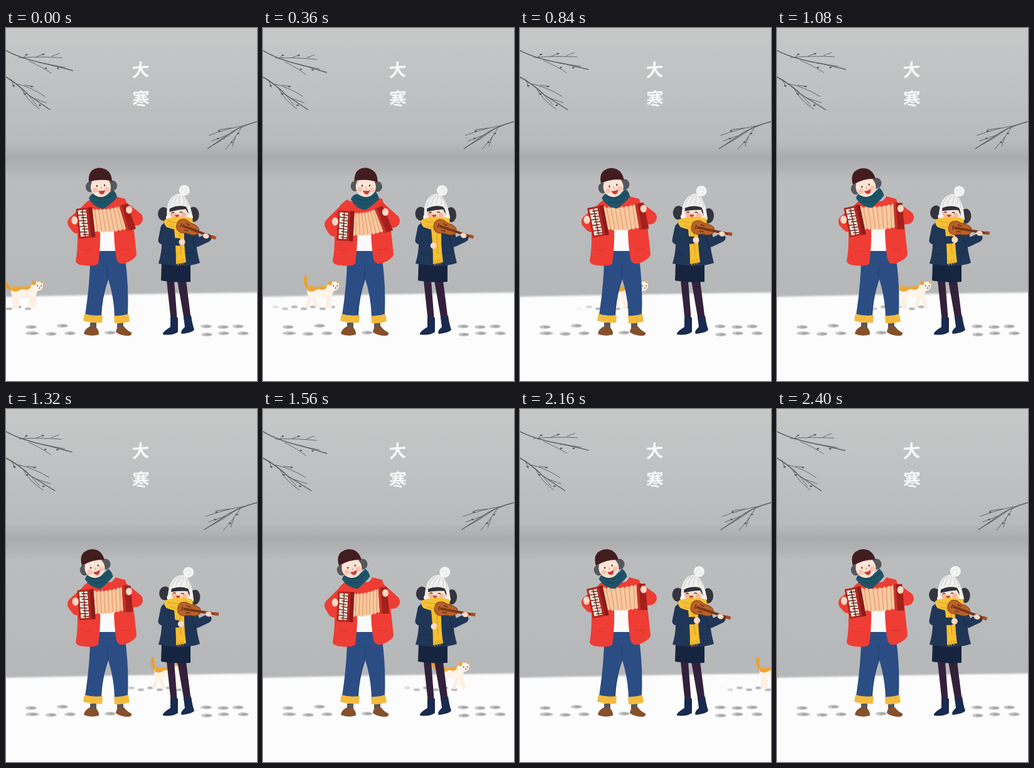
An HTML page for the animation above (2520 ms loop, 400x562 px).

```html
<!DOCTYPE html>
<html lang="zh">
<head>
<meta charset="utf-8">
<style>
  html, body { margin: 0; width: 100%; height: 100%; overflow: hidden; background: #fcfcfc; }
  svg { display: block; width: 100vw; height: 100vh; }
  .title { font: 700 28px "Noto Sans CJK SC", "Noto Sans CJK", "Noto Serif", serif; fill: #f8f8f6; text-anchor: middle; }
  .line { fill: none; stroke-linecap: round; stroke-linejoin: round; }
</style>
</head>
<body>
<svg viewBox="0 0 400 562">
  <defs>
    <linearGradient id="sky" x1="0" y1="0" x2="0" y2="1">
      <stop offset="0" stop-color="#c6c8c8"/>
      <stop offset=".22" stop-color="#c0c1c2"/>
      <stop offset=".42" stop-color="#b9babb"/>
      <stop offset=".48" stop-color="#abacae"/>
      <stop offset=".52" stop-color="#b1b2b4"/>
      <stop offset=".56" stop-color="#bbbcbe"/>
      <stop offset=".8" stop-color="#b8babb"/>
      <stop offset="1" stop-color="#b5b7b8"/>
    </linearGradient>
    <filter id="soft" x="-5%" y="-20%" width="110%" height="140%"><feGaussianBlur stdDeviation="1.5"/></filter>
    <clipPath id="scene"><rect width="400" height="562"/></clipPath>
  </defs>

  <g clip-path="url(#scene)">
    <rect width="400" height="430" fill="url(#sky)"/>
    <path d="M-9 428 Q90 426 200 424 T409 421 V580 H-9Z" fill="#fcfcfc" filter="url(#soft)"/>
    <g id="steps" fill="#c3c4c6"></g>
    <g id="twigs" class="line" stroke="#5c5e62"></g>
    <g class="title">
      <text transform="translate(214.5 77) skewY(-4)">大</text>
      <text transform="translate(215 123) skewY(-3)">寒</text>
    </g>

    <g id="prints" fill="#b9babd"></g>
    <g id="cat">
      <path id="catTail" class="line" stroke="#e9a02f" stroke-width="5"/>
      <path id="catLegs" class="line" stroke="#fbf0e2" stroke-width="6"/>
      <path d="M-42 415 Q-42 410 -34 412 Q-22 414 -8 409 L1 413 Q0 428 -9 429 Q-23 426 -34 430 Q-43 429 -42 415Z" fill="#fdf3e7"/>
      <path d="M-42 417 Q-42 409 -33 411.5 Q-22 413 -10 409.5 Q-11 417 -18 417 Q-24 414 -29 418 Q-37 422 -42 417Z" fill="#eda537"/>
      <path d="M-8 411 L-8 401 L-2 404 H3 L8 402 L9 410 Q8 418 1 418.5 Q-7 418 -8 411Z" fill="#fdf3e7"/>
      <path d="M-8 409 L-8 401 L-2 404 L-3 409ZM4 404 L8 402 L8 407Z" fill="#e9a02f"/>
      <path d="M0 410v1M6 410v1M3 414h1" class="line" stroke="#4c3a34" stroke-width="1.4"/>
    </g>

    <g id="man">
      <path d="M134 469 h10 v9 h-10ZM177 469 h10 v8 h-10Z" fill="#56585f"/>
      <path d="M124 487 Q125 479 134 475 L143 476 Q149 482 148 488 Q136 492 124 487ZM175 484 Q176 477 180 475 L188 475 Q192 481 200 485 Q201 489 196 490 Q182 490 175 484Z" fill="#85502c"/>
      <path d="M134 366 L150 350 H174 L190 368 Q196 410 194 458 L173 459 Q172 428 163 400 Q153 428 152 459 L126 457 Q134 405 134 366Z" fill="#2b4d84"/>
      <path d="M162 378 V400 Q153 428 151 456" class="line" stroke="#1f3f70" stroke-width="1"/>
      <path d="M125 455 Q138 459 154 457 L153 469 Q136 470 123 466ZM172 458 Q184 459 195 455 L197 467 Q184 471 173 470Z" fill="#f3bb3d"/>
      <path d="M147 290 H174 V355 H148Z" fill="#fafafa"/>
      <path d="M134 273 Q121 281 114 298 L114 334 Q114 357 111 371 Q112 377 124 378 Q143 380 147 375 Q151 347 150 318 L148 282ZM174 268 L190 272 L203 315 Q206 340 208 360 Q207 368 189 375 Q179 377 176 368 Q172 345 172 315 L167 282Z" fill="#ee3d34"/>
      <path d="M121 353 q7 3 15 1 M183 352 q8 2 16 -1" class="line" stroke="#d32e28" stroke-width="1" opacity=".6"/>
      <path d="M137 280 L176 274 L174 308 H149Z" fill="#ee3d34"/>
      <path id="sleeves" class="line" stroke="#ee3d34" stroke-width="22"/>
      <path id="folds" class="line" stroke="#cf2d28" stroke-width="1"/>
      <path id="bellows" fill="#f8c9a0"/>
      <path id="pleats" class="line" stroke="#e79a70" stroke-width="1.3"/>
      <g id="basses">
        <path d="M-8 -21 L6 -21 L9 21 L-6 21Z" fill="#a3201d"/>
        <path d="M-8 -21 L-4 -21 L-2 21 L-6 21Z" fill="#c83227"/>
      </g>
      <g id="keys">
        <rect x="-13" y="-24" width="26" height="48" rx="1.5" fill="#b4271f"/>
        <path d="M13 -24 v48 h-6 v-48Z" fill="#8c1b1a"/>
        <rect x="-10" y="-21" width="13" height="42" fill="#fbefe0"/>
        <path id="keyLines" class="line" stroke="#6d2320" stroke-width="1.5"/>
      </g>
      <g id="hands" fill="#fbd9c5"></g>
      <g id="manScarf">
        <path d="M132 271 Q136 262 143 263 Q158 271 170 257 Q176 262 177 270 Q169 279 156 288 Q140 286 132 271Z" fill="#1f5468"/>
        <path d="M139 268 Q155 278 172 264 M143 276 Q153 281 164 276" class="line" stroke="#174457" stroke-width="1.2"/>
      </g>
      <g id="manHead">
        <ellipse cx="-17" cy="2" rx="7" ry="8.5" fill="#55575d"/>
        <ellipse cx="18" cy="0" rx="8" ry="8.5" fill="#55575d"/>
        <ellipse cx="0" cy="2" rx="16" ry="16" fill="#fde4d5"/>
        <circle cx="-9" cy="7" r="4" fill="#f8b7a0" opacity=".75"/>
        <circle cx="10" cy="6" r="4" fill="#f8b7a0" opacity=".75"/>
        <path d="M-6 0v1M6 -1v1" class="line" stroke="#362422" stroke-width="2"/>
        <path d="M0 2 q3 2 0 3" class="line" stroke="#ea9b83" stroke-width="1.2"/>
        <path d="M-4 8 Q2 9 7 7 Q6 14 2 14 Q-2 14 -4 8Z" fill="#d23b35"/>
        <path d="M-19 -6 Q-21 -27 -2 -28.5 Q17 -27 18 -7 Q0 -12 -19 -6Z" fill="#421d20"/>
      </g>
    </g>

    <g id="girl">
      <path d="M256 402 H268 L273 467 H263ZM273 402 H287 L295 465 H284Z" fill="#33213c"/>
      <path d="M262 461 L274 461 L274 484 Q265 490 250 488 Q249 484 262 476ZM283 460 L295 458 Q297 472 300 480 Q298 485 280 487 Q277 483 285 476Z" fill="#182a50"/>
      <path d="M248 374 H294 L294 404 Q272 406 247 402Z" fill="#16243f"/>
      <path d="M254 306 Q272 316 296 308 Q303 326 303 340 Q304 356 309 374 Q285 383 243 375 Q249 355 248 337 Q246 316 254 306Z" fill="#203656"/>
      <path d="M296 318 L304 342 L321 334" class="line" stroke="#203656" stroke-width="13"/>
      <path d="M297 332 L301 350 M252 360 h9 M288 358 h10" class="line" stroke="#172a47" stroke-width="1.2"/>
      <path d="M267 312 L284 311 Q283 345 287 373 L271 376 Q271 344 267 312Z" fill="#f5bf30"/>
      <path d="M274 370v8M278 369v8M282 368v8M277 322 q0 20 2 38" class="line" stroke="#d89a20" stroke-width="1.2"/>
      <path d="M253 318 L249 338" class="line" stroke="#203656" stroke-width="13"/>
      <path id="bowArm" class="line" stroke="#203656" stroke-width="12"/>
      <circle id="bowHand" r="5" fill="#fbd9c5"/>
      <g id="girlHead">
        <ellipse cx="252" cy="295" rx="9" ry="11" fill="#34343e"/>
        <ellipse cx="300" cy="298" rx="8.5" ry="12" fill="#34343e"/>
        <ellipse cx="275" cy="294" rx="17" ry="15" fill="#fde1d0"/>
        <path d="M258 296 Q258 280 277 281 Q295 282 294 299 Q288 292 288 289 Q275 289 262 292Z" fill="#30303a"/>
        <circle cx="266" cy="298" r="4" fill="#f7ab8d" opacity=".8"/>
        <circle cx="284" cy="298" r="4" fill="#f7ab8d" opacity=".8"/>
        <path d="M265 294 q2 -2 4 0M278 294 q2 -2 4 0" class="line" stroke="#3d2a2a" stroke-width="1.2"/>
        <path d="M270 297 h7 q-1 5 -4 5 q-3 -1 -3 -5Z" fill="#d4443a"/>
        <path d="M257 299 Q257 268 276 264 Q292 263 298 300 L292 301 Q292 290 288 285 Q275 281 262 287 Q262 294 260 302Z" fill="#efefed"/>
        <path d="M262 284 Q265 270 274 266M269 281 Q271 272 277 267M277 280 Q279 272 280 267M285 281 Q287 273 283 268M291 285 Q292 277 287 271" class="line" stroke="#cfd0d0" stroke-width="1.2"/>
        <circle cx="287" cy="259" r="8.5" fill="#f4f4f2"/>
        <path d="M282 259 l3 -3M288 263 l3 -3M288 255 l2 2" class="line" stroke="#d9d9d8"/>
        <circle cx="260" cy="301" r="4.5" fill="#f4f4f2"/>
        <circle cx="294" cy="302" r="4.5" fill="#f4f4f2"/>
      </g>
      <path d="M253 305 Q274 297 297 303 Q299 313 294 318 Q275 325 256 317 Q250 311 253 305Z" fill="#f6c136"/>
      <path d="M258 307 Q272 313 288 307M261 315 Q270 318 276 317" class="line" stroke="#dba026" stroke-width="1.2"/>
      <g id="violin">
        <path d="M-17 0 Q-17 -11 -5 -11 Q2 -8 9 -8.5 Q20 -7 20 0 Q20 7 9 8.5 Q2 8 -5 11 Q-17 11 -17 0Z" fill="#b9622a" stroke="#873f1a"/>
        <path d="M-8 -2 H46 V2 H-8Z" fill="#7a3517"/>
        <path d="M42 -3 h7 v5 h-7Z" fill="#a34f20"/>
        <path d="M-3 -6 q3 2 6 1M-3 6 q3 -2 6 -1M-10 -3 v6" class="line" stroke="#55230f" stroke-width="1.2"/>
        <ellipse cx="33" cy="2" rx="5" ry="4" fill="#fbd9c5"/>
      </g>
    </g>
  </g>
</svg>

<script>
const STEP = 120, COUNT = 21;
const $ = id => document.getElementById(id);
const set = (id, name, value) => $(id).setAttribute(name, value);
const ellipse = (x, y, rx, ry, extra = '') => `<ellipse cx="${x}" cy="${y}" rx="${rx}" ry="${ry}" ${extra}/>`;
const place = (id, x, y, turn) => set(id, 'transform', `translate(${x} ${y}) rotate(${turn})`);

// A cosine that repeats a whole number of times per loop.
const beat = (n, cycles, peak = 0) => Math.cos(2 * Math.PI * cycles * (n - peak) / COUNT);

// Rows are [step, ...values]; the track wraps around the loop.
function track(rows, n) {
  const looped = [...rows, [COUNT, ...rows[0].slice(1)]];
  const i = looped.findIndex(row => row[0] > n);
  const a = looped[i - 1], b = looped[i];
  const u = (n - a[0]) / (b[0] - a[0]);
  const k = u * u * (3 - 2 * u);
  return a.slice(1).map((v, j) => v + (b[j + 1] - v) * k);
}

const headTrack = [[0, 151, 0], [3, 164, 5], [5, 156, 0], [9, 141, -13], [20, 141, -13]];

const twigs = [
  { id: 'twigA', x: 0, y: 36, main: 'M0 0 Q28 14 72 21 L110 30', fine: 'M22 11 Q55 8 92 10M38 16 Q60 25 75 35M50 9 L63 4M64 20 L98 25M75 8 L88 3M28 12 L34 5',
    buds: [[61, 5], [34, 6], [66, 27], [86, 27]] },
  { id: 'twigB', x: 0, y: 78, main: 'M0 0 Q20 12 35 28 L70 52', fine: 'M8 4 L13 16M18 11 Q40 16 62 31M24 17 Q32 36 53 51M35 28 L48 44M42 33 L64 41M30 13 L43 15',
    buds: [[12, 14], [30, 27], [41, 15], [54, 45]] },
  { id: 'twigC', x: 400, y: 149, main: 'M0 0 Q-30 8 -52 25 L-78 43', fine: 'M-18 6 Q-45 10 -76 22M-30 11 Q-50 27 -69 37M-24 8 Q-34 26 -50 44M-46 21 L-72 31M-40 10 L-60 13M-34 24 L-39 39',
    buds: [[-40, 33], [-62, 27], [-60, 15], [-30, 19]] }
];

$('twigs').innerHTML = twigs.map(t => `<g id="${t.id}"><path d="${t.main}" stroke-width="1.5"/>
  <path d="${t.fine}" stroke-width=".9"/>${t.buds.map(([x, y]) => ellipse(x, y, 2, 1.2, 'fill="#5c5e62" stroke="none"')).join('')}</g>`).join('');

$('steps').innerHTML = [[40, 476], [72, 487], [90, 474], [102, 486], [42, 486], [166, 485],
  [319, 475], [320, 488], [346, 476], [347, 486], [370, 475], [378, 486]]
  .map(([x, y], i) => ellipse(x, y, i === 4 ? 11 : 9, 3) + ellipse(x + 2, y, 5, 1.6, 'fill="#a4a5a8"')).join('');

set('keyLines', 'd', 'M-3 -21V21' + Array.from({ length: 9 }, (_, i) => `M${i % 2 ? -10 : -6} ${-18 + i * 4.5}L${i % 2 ? 1 : 3} ${-17 + i * 4.5}`).join(''));

function turned(x, y, turn, px, py) {
  const a = turn * Math.PI / 180;
  return [x + px * Math.cos(a) - py * Math.sin(a), y + px * Math.sin(a) + py * Math.cos(a)];
}

function pleatRow(start, end, sign) {
  return Array.from({ length: 17 }, (_, i) => {
    const u = i / 16, sag = 12 * u * (1 - u);
    return [start[0] + (end[0] - start[0]) * u, start[1] + (end[1] - start[1]) * u + sag + (i % 2 ? sign * 2.5 : 0)];
  });
}

function drawAccordion(squeeze, headTurn) {
  const key = [127.5 + 4 * squeeze, 311 + 4 * squeeze, -5 + 8 * squeeze];
  const bass = [193 - squeeze, 302 + 3 * squeeze, -14 - headTurn];
  place('keys', ...key);
  place('basses', ...bass);
  const top = pleatRow(turned(...key, 11, -20), turned(...bass, -5, -19), -1);
  const base = pleatRow(turned(...key, 11, 13), turned(...bass, -5, 16), 1);
  set('bellows', 'd', 'M' + [...top, ...base.slice().reverse()].join('L') + 'Z');
  set('pleats', 'd', top.map((p, i) => i % 2 ? '' : `M${p}L${base[i]}`).join(''));

  const [lx, ly] = turned(...key, -17, -6);
  const rx = bass[0] + 3, ry = bass[1] - 12;
  set('sleeves', 'd', `M136 286 L109 ${308 + (key[1] - 307) * .6}L114 ${key[1] + 6}M178 281 L207 ${bass[1] + 2}L198 ${bass[1] + 3}`);
  set('folds', 'd', `M121 292 Q112 298 ${lx + 3} ${ly - 6}M190 280 Q197 283 ${rx + 2} ${ry - 6}`);
  $('hands').innerHTML = ellipse(lx, ly, 5, 6.5) + ellipse(rx, ry, 5, 6);
}

function drawCat(n) {
  const x = 50 + 20.75 * n, swing = Math.sin(n * Math.PI / 2) * 5;
  set('cat', 'transform', `translate(${x} 0)`);
  set('catLegs', 'd', [[-37, 1], [-32, -1], [-10, -1], [-5, 1]]
    .map(([hip, dir]) => `M${hip} 425Q${hip + dir * swing * .3} 435 ${hip + dir * swing} 443`).join(''));
  const wag = beat(n, 3);
  set('catTail', 'd', `M-39 415Q-46 ${413 + 3 * wag} ${-47 - 3 * wag} ${402 + 5 * wag}`);
  let marks = '';
  for (let p = 5; p < x; p += 15) {
    const opacity = Math.min(1, (105 - x + p) / 35);
    if (opacity > 0) marks += ellipse(p, 444 + (p % 2) * 3, 5, 2.2, `opacity="${opacity}"`);
  }
  $('prints').innerHTML = x < 440 ? marks : '';
}

function draw(n) {
  const sway = beat(n, 1), squeeze = beat(n, 2, 2.9);
  set('twigA', 'transform', `translate(0 36) rotate(${1.2 + 1.5 * squeeze}) scale(${.965 - .03 * squeeze} 1)`);
  set('twigB', 'transform', `translate(0 78) scale(${1.055 - .055 * sway} 1)`);
  set('twigC', 'transform', `translate(400 149) scale(${1.04 - .035 * sway} 1)`);

  const [headX, headTurn] = track(headTrack, n);
  place('manHead', headX, 251, headTurn);
  set('manScarf', 'transform', `translate(${(headX - 151) * .6} ${(headX - 151) * .15}) rotate(${headTurn * .3} 152 275)`);
  drawAccordion(squeeze, headTurn);

  set('girlHead', 'transform', `rotate(${.5 - 3.5 * sway} 275 312)`);
  place('violin', 289.5 - sway, 318.5 - sway, 15 + 6 * sway);
  const handX = 277.5 - 6 * beat(n, 2, 3.5), handY = 341.5 + 5 * squeeze;
  set('bowArm', 'd', `M249 338L${handX - 6} ${handY}`);
  set('bowHand', 'cx', handX);
  set('bowHand', 'cy', handY);
  drawCat(n);
}

let shown = -1;
const start = performance.now();
function tick() {
  const n = Math.floor((performance.now() - start) / STEP) % COUNT;
  if (n !== shown) draw(shown = n);
  requestAnimationFrame(tick);
}
tick();
</script>
</body>
</html>
```
